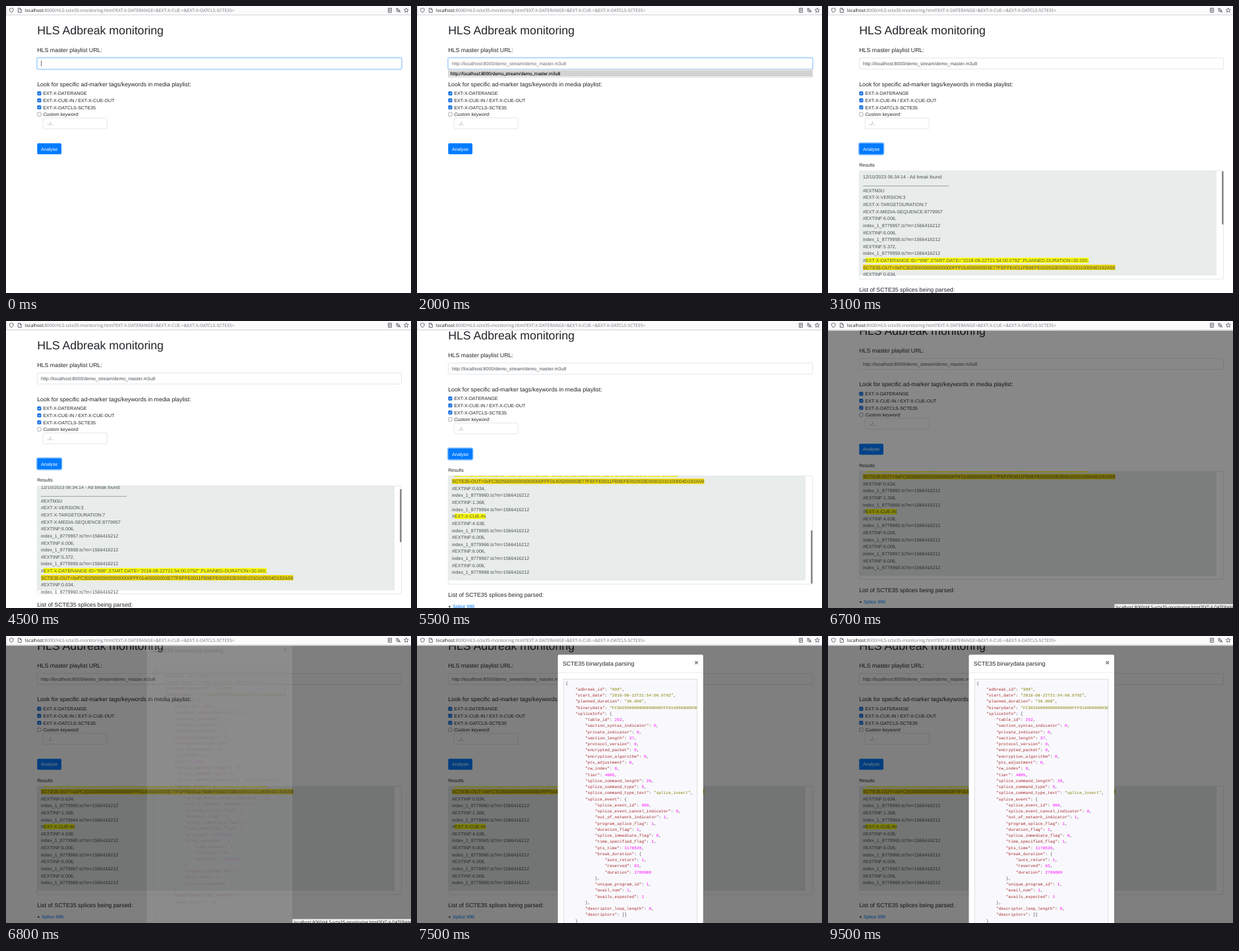
These frames come from a looping animation (614x436 px, 9600 ms). An HTML page:

```html
<!DOCTYPE html>
<html lang="en">
<head>
<meta charset="utf-8">
<title>HLS Adbreak monitoring</title>
<style>
  html, body { margin: 0; width: 100%; height: 100%; overflow: hidden; background: #fff; }
  svg { display: block; }
  text { font: 7.08px "Liberation Sans", Arial, sans-serif; fill: #212529; white-space: pre; text-rendering: geometricPrecision; }
  .ui { font-family: "Open Sans", "Noto Sans", sans-serif; }
  .mono { font: 6.2px "Liberation Mono", monospace; fill: #444; }
  .key { fill: #a52a2a; }
  .str { fill: #808000; }
  .num { fill: #f0f; }
</style>
</head>
<body>
<svg id="stage" width="614" height="436" viewBox="0 0 614 436">
  <defs>
    <clipPath id="logClip"><rect x="47.4" y="250.6" width="552" height="164"/></clipPath>
    <clipPath id="preClip"><rect x="222" y="60" width="202.6" height="420"/></clipPath>
  </defs>
</svg>
<script>
const LOOP = 9600, STEP = 100, LINE = 10.625;
const stage = document.getElementById('stage');
const URL_TEXT = 'http://localhost:8000/demo_stream/demo_master.m3u8';
const HOST = 'localhost';
const PATH = ':8000/HLS-scte35-monitoring.html?EXT-X-DATERANGE=&EXT-X-CUE-=&EXT-X-OATCLS-SCTE35=';
const BINARY = 'FC302500000000000000FFF01405000003E77FEFFE0011FB9EFE002932E00001010100004D192A59';

function el(parent, tag, attrs = {}, content) {
  const node = document.createElementNS('http://www.w3.org/2000/svg', tag);
  for (const k in attrs) node.setAttribute(k, attrs[k]);
  if (content !== undefined) node.textContent = content;
  parent.appendChild(node);
  return node;
}
const group = (parent, attrs) => el(parent, 'g', attrs);
const rect = (parent, x, y, width, height, fill, more) =>
  el(parent, 'rect', { x, y, width, height, fill, ...more });
const path = (parent, d, stroke, width, more) =>
  el(parent, 'path', { d, stroke, 'stroke-width': width, fill: 'none', ...more });
const text = (parent, x, y, str, style = '', cls = '') =>
  el(parent, 'text', { x, y, style, class: cls }, str);
const show = (node, on) => node.setAttribute('visibility', on ? 'visible' : 'hidden');
const ring = (parent, x, y, w, h, color) =>
  rect(parent, x - .7, y - .7, w + 1.4, h + 1.4, 'none', { stroke: color, 'stroke-width': 1.4, rx: 2.4 });
const field = (parent, x, y, w, h) =>
  rect(parent, x, y, w, h, '#fff', { stroke: '#ced4da', 'stroke-width': .6, rx: 1.8 });

// Page
const page = group(stage);
rect(page, 0, 0, 614, 480, '#fff');
text(page, 47.2, 42.8, 'HLS Adbreak monitoring', 'font-size:17.7px');
text(page, 47.2, 69.8, 'HLS master playlist URL:', 'font-size:8.85px');
const urlRing = ring(page, 47.3, 79, 552.4, 16.8, '#bfdeff');
const urlField = field(page, 47.3, 79, 552.4, 16.8);
const urlText = text(page, 53, 89.9, URL_TEXT);
const caret = rect(page, 53.1, 83, .7, 8.6, '#333');
text(page, 47.2, 121.6, 'Look for specific ad-marker tags/keywords in media playlist:', 'font-size:8.85px');

['EXT-X-DATERANGE', 'EXT-X-CUE-IN / EXT-X-CUE-OUT', 'EXT-X-OATCLS-SCTE35', 'Custom keyword:'].forEach((label, i) => {
  const y = 132.7 + i * LINE, custom = i === 3;
  rect(page, 47.7, y - 2.7, 5.4, 5.4, custom ? '#fff' : '#0b6be0',
    { rx: .9, stroke: custom ? '#777' : '#0b6be0', 'stroke-width': .6 });
  if (!custom) path(page, `M48.8 ${y}l1.2 1.3 2.1-2.7`, '#fff', .8);
  text(page, 56.2, y + 2.7, label, custom ? 'font-style:italic' : '');
});
field(page, 56.2, 170, 97, 16.6);
text(page, 62, 180.7, '../..', 'fill:#6c757d');

const btnRing = ring(page, 47.3, 208.6, 36.7, 16.7, '#7fbdff');
rect(page, 47.3, 208.6, 36.7, 16.7, '#007bff', { rx: 1.8 });
text(page, 53.1, 219.6, 'Analyse', 'fill:#fff');

// Results
const results = group(page);
text(results, 47.2, 243.8, 'Results');
field(results, 47.3, 250.4, 552.4, 164.4);
const log = group(results, { 'clip-path': 'url(#logClip)' });
rect(log, 47.6, 250.6, 541.4, 158.6, '#e8ecea');
const logText = group(log);
const segment = (time, n) => [`#EXTINF:${time},`, `index_1_${n}.ts?m=1566416212`];
const logLines = [
  '12/10/2023 06:34:14 - Ad break found:', '_'.repeat(33),
  '#EXTM3U', '#EXT-X-VERSION:3', '#EXT-X-TARGETDURATION:7', '#EXT-X-MEDIA-SEQUENCE:8779957',
  ...segment('6.006', 8779957), ...segment('6.006', 8779958), ...segment('5.372', 8779959),
  '#EXT-X-DATERANGE:ID="999",START-DATE="2018-08-22T21:54:00.079Z",PLANNED-DURATION=30.000,',
  'SCTE35-OUT=0x' + BINARY,
  ...segment('0.634', 8779960), ...segment('1.368', 8779964),
  '#EXT-X-CUE-IN',
  ...segment('4.638', 8779965), ...segment('6.006', 8779966),
  ...segment('6.006', 8779967), ...segment('6.006', 8779968)
];
const lineY = i => 258.9 + i * LINE;
const mark = (i, x, w, fill) => rect(logText, x, lineY(i) - 4, w, 8, fill);
mark(12, 56.9, 338.3, '#ff0');
mark(13, 53, 382.5, '#ecd500');
mark(18, 56.9, 47.3, '#ff0');
logLines.forEach((str, i) => text(logText, 53, lineY(i) + 2.6, str, 'fill:#495057'));
const thumb = rect(results, 597.2, 0, 2.3, 81, '#7d7d7d', { rx: 1.1 });
text(results, 47.2, 433.8, 'List of SCTE35 splices being parsed:', 'font-size:8.85px');
el(results, 'circle', { cx: 49.4, cy: 449, r: 1.2, fill: '#212529' });
const link = text(results, 54, 451, 'Splice 999');

// Suggestion list under the URL field
const list = group(page);
rect(list, 47.6, 96.6, 552, 11.6, '#fff', { stroke: '#c4c4c4', 'stroke-width': .6 });
const listRow = rect(list, 48.2, 97.6, 550.8, 9.4, '#d2d2d2');
text(list, 50.4, 104.9, URL_TEXT, 'font-size:6.37px;fill:#000;stroke:#000;stroke-width:.14px', 'ui');

// Dialog
const backdrop = rect(stage, 0, 0, 614, 436, '#000');
const modal = group(stage);
rect(modal, 213.4, 28.3, 220.6, 460, '#fff', { rx: 2, stroke: '#000', 'stroke-opacity': .2, 'stroke-width': .5 });
text(modal, 220.7, 45.1, 'SCTE35 binarydata parsing', 'font-size:8.85px');
text(modal, 420.4, 44.3, '×', 'font-size:10.6px;font-weight:bold;fill:#666');
rect(modal, 213.6, 55.2, 220.2, .6, '#dee2e6');
rect(modal, 222.2, 65.6, 202.6, 420, '#f9f9fd', { stroke: '#ccccd4', 'stroke-width': .6 });
const pre = group(modal, { 'clip-path': 'url(#preClip)' });

const splice = {
  adbreak_id: '999', start_date: '2018-08-22T21:54:00.079Z', planned_duration: '30.000', binarydata: BINARY,
  spliceInfo: {
    table_id: 252, section_syntax_indicator: 0, private_indicator: 0, section_length: 37,
    protocol_version: 0, encrypted_packet: 0, encryption_algorithm: 0, pts_adjustment: 0,
    cw_index: 0, tier: 4095, splice_command_length: 20, splice_command_type: 5,
    splice_command_type_text: 'splice_insert',
    splice_event: {
      splice_event_id: 999, splice_event_cancel_indicator: 0, out_of_network_indicator: 1,
      program_splice_flag: 1, duration_flag: 1, splice_immediate_flag: 0, time_specified_flag: 1,
      pts_time: 1178526,
      break_duration: { auto_return: 1, reserved: 63, duration: 2700000 },
      unique_program_id: 1, avail_num: 1, avails_expected: 1
    },
    descriptor_loop_length: 0, descriptors: []
  }
};
JSON.stringify(splice, null, 4).split('\n').forEach((str, i) => {
  const indent = str.search(/\S/);
  const row = text(pre, 225.2 + indent * 3.72, 73.6 + i * 9.26, '', '', 'mono');
  for (const [part] of str.trim().matchAll(/"[^"]*"(?=:)|"[^"]*"|\d+|[^"\d]+/g)) {
    const isKey = part[0] === '"' && str.includes(part + ':');
    const cls = isKey ? 'key' : part[0] === '"' ? 'str' : /\d/.test(part) ? 'num' : '';
    el(row, 'tspan', { class: cls }, part);
  }
});

// Browser bar
const bar = group(stage);
rect(bar, 0, 0, 614, 14.6, '#fbfbfc');
rect(bar, 0, 13.2, 614, .7, '#c9c9ce');
rect(bar, .6, 0, .6, 13.4, '#c9c9ce');
const icon = d => path(bar, d, '#4a4a52', .8);
icon('M8.3 3C7 4 6 4 5.4 4.2c0 3 .9 4.700 2.900 5.700 2-1 2.900-2.700 2.900-5.700C10.600 4 9.600 4 8.300 3z');
icon('M18.400 3.300h2.900l2 2v4.300h-4.900zM21.100 3.300v2.200h2.200');
icon('M579.500 3.300h5v6.200h-5zM580.700 5h2.600M580.700 6.400h2.600M580.700 7.800h1.600');
icon('M591 4.200h4M593 3.200v1M594.400 4.200c-.4 1.800-1.600 3-3.200 3.800M591.800 5.200c.6 1.200 1.400 1.800 2.400 2.400M594 9.800l1.900-4.300 1.900 4.300M594.700 8.400h2.400');
icon('M606.800 2.900l1 2.200 2.400.3-1.800 1.600.5 2.400-2.100-1.200-2.100 1.200.5-2.400-1.800-1.600 2.400-.3z');
const address = text(bar, 28.8, 8.9, '', 'font-size:6.68px', 'ui');
el(address, 'tspan', { fill: '#15141a' }, HOST);
el(address, 'tspan', { fill: '#77767d' }, PATH);

const tip = group(stage);
rect(tip, 434.2, 430, 182, 9, '#f3f3f4', { stroke: '#aaa', 'stroke-width': .6 });
text(tip, 436.2, 436.800, HOST + PATH, 'font-size:6.36px;fill:#111', 'ui');

// Timeline
const pageScroll = [[0, 0], [5400, 6], [5500, 15], [5600, 20], [5700, 22.1]];
const logScroll = [[0, 0], [4500, 7], [4600, 76], [4700, 138.5]];
const at = (table, t) => table.reduce((v, [time, next]) => t >= time ? next : v, 0);
const ramp = (t, from, length) => Math.min(1, Math.max(0, (t - from) / length));
const within = (t, from, to) => t >= from && t < to;

function draw(t) {
  page.setAttribute('transform', `translate(0 ${-at(pageScroll, t)})`);

  const urlFocus = t < 2700;
  show(urlRing, urlFocus);
  urlField.setAttribute('stroke', urlFocus ? '#80bdff' : '#ced4da');
  show(caret, t < 600 || within(t, 1200, 1800));
  show(urlText, t >= 2000);
  urlText.style.fill = t < 2100 ? '#6a6a6a' : '#495057';
  show(list, within(t, 1200, 2100));
  show(listRow, within(t, 1500, 2100));

  show(btnRing, within(t, 2700, 6600));
  show(results, t >= 2700);
  const s = at(logScroll, t);
  logText.setAttribute('transform', `translate(0 ${-s})`);
  thumb.setAttribute('y', 251 + s / 138.5 * 82);
  show(thumb, within(t, 2700, 6600));

  const hover = within(t, 5900, 6700);
  link.style.fill = hover ? '#0056b3' : '#007bff';
  link.style.textDecoration = hover ? 'underline' : 'none';
  show(tip, within(t, 5900, 6900));

  backdrop.setAttribute('opacity', .5 * ramp(t, 6560, 150));
  modal.setAttribute('opacity', ramp(t, 6785, 150));
  const left = 1 - ramp(t, 6785, 300);
  modal.setAttribute('transform', `translate(0 ${-22.1 * left * left})`);
}

const start = performance.now();
function tick() {
  const t = (performance.now() - start) % LOOP;
  draw(Math.floor(t / STEP) * STEP);
  requestAnimationFrame(tick);
}
draw(0);
requestAnimationFrame(tick);
</script>
</body>
</html>
```
